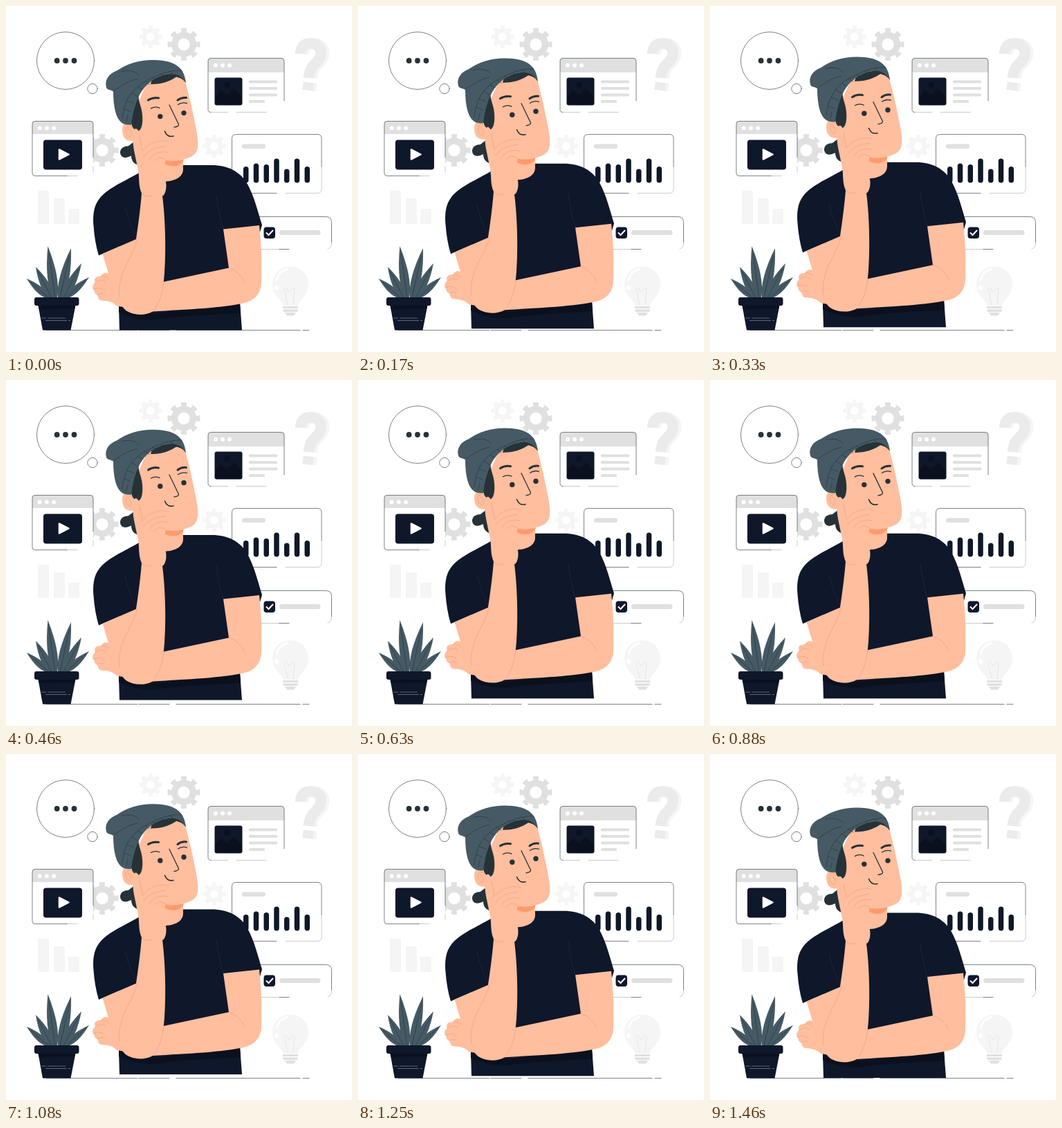
Recreate the animation shown at these times as an HTML page. Size 500x500 px, loop 1500 ms.

```html
<!DOCTYPE html>
<html lang="en">
<head>
<meta charset="utf-8">
<title>Thinking</title>
<style>
html, body { margin: 0; width: 100%; height: 100%; overflow: hidden; background: #fff; }
svg { display: block; width: 100%; height: 100%; }
.navy { fill: #0f172a; }
.shade { fill: #0a101e; }
.dark { fill: #263238; }
.slate { fill: #455a64; }
.skin { fill: #ffbe9d; }
.grey { fill: #e0e0e0; }
.pale { fill: #f5f5f5; }
.white { fill: #fff; }
.line, .faint, .crease, .bold, .rib { fill: none; stroke-linecap: round; stroke-linejoin: round; }
.line { stroke: #263238; stroke-width: .6; }
.faint { stroke: #263238; stroke-width: .25; }
.crease { stroke: #eb9d78; stroke-width: .6; }
.bold { stroke: #263238; stroke-width: 1.3; }
.rib { stroke: #263238; stroke-width: .6; }
</style>
</head>
<body>
<svg viewBox="0 0 500 500">
  <defs>
    <g id="mark" fill="none" stroke-width="15.500">
      <path d="M425.500 69C426 57 433 53.500 441 54C450 54.500 456 60 455 69C454 83 439 82 437.500 104"/>
      <path d="M437.500 110.500L436 122"/>
    </g>
  </defs>

  <g id="gears"></g>

  <g class="pale">
    <rect x="46" y="267" width="16" height="48"/>
    <rect x="69" y="278" width="16" height="37"/>
    <rect x="90" y="293" width="16" height="22"/>
  </g>

  <!-- question mark -->
  <use href="#mark" stroke="#f5f5f5" x="4.500" y=".5"/>
  <use href="#mark" stroke="#ebebeb"/>

  <!-- light bulb -->
  <path class="pale" d="M400 433C399 424 385 419 385 402A26 26 0 0 1 437 402C437 419 423 424 422 433Z"/>
  <path d="M391 396C393 387 399 382 407 380" fill="none" stroke="#fff" stroke-width="2.500" stroke-linecap="round"/>
  <circle class="white" cx="391" cy="407" r="3.500"/>
  <path d="M407 432L402 409Q405 404 407 410T412 410T417 409L415 432" fill="none" stroke="#e0e0e0" stroke-width=".7"/>
  <path class="grey" d="M400 434H422V437H400ZM400 438.500H422L421 442H401ZM403 443H419L416 447.500H406Z"/>

  <!-- thought bubble and ground -->
  <g class="line">
    <circle cx="86" cy="79" r="41.500"/>
    <circle cx="125" cy="119.500" r="7.200"/>
    <path d="M58 468.500H190M192 468.500H236M246 468.500H425M429 468.500H438"/>
  </g>
  <g class="dark">
    <circle cx="73.700" cy="79" r="3.900"/><circle cx="86" cy="79" r="3.900"/><circle cx="98.500" cy="79" r="3.900"/>
  </g>

  <!-- article window -->
  <rect class="white" x="292" y="75.500" width="110" height="78" rx="4"/>
  <path class="grey" d="M292 96V79.500Q292 75.500 296 75.500H398Q402 75.500 402 79.500V96Z"/>
  <path class="line" d="M296 153.500Q292 153.500 292 149.500V79.500Q292 75.500 296 75.500H398Q402 75.500 402 79.500V137"/>
  <path class="faint" d="M296 153.500H321M333 153.500H376"/>
  <g class="white"><circle cx="303" cy="85.700" r="3"/><circle cx="313" cy="85.700" r="3"/><circle cx="323" cy="85.700" r="3"/></g>
  <rect class="navy" x="301.500" y="103.500" width="40" height="40" rx="3"/>
  <path class="shade" d="M302 132L311 121L319 129L330 119L341 132V140Q341 143 338 143H305Q302 143 302 140Z"/>
  <circle class="shade" cx="319.500" cy="114" r="4"/>
  <g class="grey">
    <rect x="351" y="107.500" width="41" height="4" rx="1.500"/><rect x="351" y="117" width="41" height="4" rx="1.500"/>
    <rect x="351" y="126.500" width="41" height="4" rx="1.500"/><rect x="351" y="136" width="23" height="4" rx="1.500"/>
  </g>

  <!-- video window -->
  <rect class="white" x="38" y="166.500" width="88" height="79" rx="4"/>
  <path class="grey" d="M38 185V170.500Q38 166.500 42 166.500H122Q126 166.500 126 170.500V185Z"/>
  <path class="line" d="M88 245.500H42Q38 245.500 38 241.500V170.500Q38 166.500 42 166.500H122Q126 166.500 126 170.500V219"/>
  <path class="faint" d="M88 245.500H103M126 232V240"/>
  <g class="white"><circle cx="48.700" cy="176.500" r="3"/><circle cx="58.900" cy="176.500" r="3"/><circle cx="69.200" cy="176.500" r="3"/></g>
  <rect class="navy" x="54" y="193.500" width="56" height="43" rx="4"/>
  <path d="M77 207.500V221.500L90.500 214.500Z" fill="#fff" stroke="#fff" stroke-width="2.500" stroke-linejoin="round"/>

  <!-- chart panel -->
  <rect class="white" x="326.500" y="185.500" width="129.500" height="85" rx="6"/>
  <path class="line" d="M391 270.500H332.500Q326.500 270.500 326.500 264.500V191.500Q326.500 185.500 332.500 185.500H450Q456 185.500 456 191.500V232"/>
  <path class="faint" d="M456 232V264.500Q456 270.500 450 270.500H404"/>
  <rect class="grey" x="341" y="199.500" width="34" height="6.500" rx="3.250"/>
  <g id="bars" class="navy"></g>

  <!-- checkbox panel -->
  <rect class="white" x="350" y="304.500" width="120.500" height="47" rx="8"/>
  <path class="line" d="M358 304.500H462.500Q470.500 304.500 470.500 312.500V341M409 351.500H395"/>
  <path class="faint" d="M470.500 341V343.500Q470.500 349 465 351M395 351.500H362"/>
  <rect class="navy" x="372.500" y="319.500" width="16.500" height="16.500" rx="4"/>
  <path d="M376.500 328L379.500 331L385.500 324.500" fill="none" stroke="#fff" stroke-width="2" stroke-linecap="round"/>
  <rect class="grey" x="395" y="324" width="59.500" height="7" rx="3.500"/>

  <!-- plant -->
  <g id="leaves"></g>
  <path class="navy" d="M46 430H101L93.500 468.500H53Z"/>
  <path class="shade" d="M46.500 433H100L99.500 437L48 438Z"/>
  <rect class="navy" x="41" y="421" width="64.500" height="12" rx="3"/>
  <path d="M51 451H58M60 451H86M57 454.500H88M90 454.500H93" stroke="#7d8792" stroke-width=".7"/>

  <g id="person">
    <path class="dark" d="M190 194C181 196 180 201 176 202C167 202 163 209 166 215C170 221 176 218 181 216C181 223 185 228 191 229Z"/>

    <!-- torso -->
    <path class="navy" d="M193 240C178 249 158 258 145 268C128 281 125 296 126.500 317C127.500 332 130 347 134 360L164 347L163 433L164 468H341L338 428L370 316C364 297 359 275 349 257C339 239 321 229.500 297 229.500H255Z"/>
    <path class="shade" d="M163 434L215 444L338 429L339 443C302 446 262 446 221 452C199 456 176 448 163 442Z"/>
    <path class="skin" d="M190 185L256 215V235C256 246 246 252 231 253L193 250Z"/>
    <path d="M228 222Q243 225 257 221Q254 230 243 231Q232 231 228 226Z" fill="#ff9a6c"/>

    <!-- folded arm -->
    <path class="skin" d="M314 322L366 316.500C369 345 370 371 369 397C369 411 363 423 347 428C315 436 260 438 212 441L160 433C153 425 144 426 138 425C132 424 134 420 132 417C126 415 129 411 126 409C124 405 126 401 129 399C126 393 131 389 137 390C140 384 147 383 150 388L172 406L228 398L322 378Z"/>
    <path class="crease" d="M322 378Q337 382 345 399M129 399Q136 393 144 398M126 409Q136 404 143 411M132 417Q137 413 142 416M137 390Q143 388 149 394"/>
    <path class="rib" d="M304 273Q307 300 314 322M172 289Q178 316 190 336"/>

    <!-- head -->
    <path class="skin" d="M192 136L206 106L256 98C265 128 270 153 275 178C278 196 280 211 268 217C254 224 238 225 226 221C207 216 191 206 187 192C183 196 176 195 172 191C166 183 167 169 174 168C179 166 183 170 185 176Z"/>
    <path class="crease" d="M184 176C178 170 172 174 173 181C174 186 177 188 181 188M177 177Q182 179 181 186"/>
    <path class="dark" d="M180 160L192 126C190 137 196 143 197 157C198 169 196 179 191 180C184 179 180 172 180 160ZM209 112.500C224 113 238 108 246 102C252 103 257 106 260 111L254 94L212 102Z"/>

    <!-- beanie -->
    <path class="slate" d="M167 168C159 162 155 146 155 123C150 120 146 121 145 117C142 106 149 97 160 93C174 83 193 77.300 212 77.300C231 77.300 245 81 253 91C257 96 259 103 260 110.500C253 99 244 96 232 98.500C216 102 202 112 194 126C186 141 183 156 181 171Q173 172 167 168Z"/>
    <path class="rib" d="M168 163C170 135 184 117 204 107C222 97 241 91 254 93M157 121C166 116 176 107 190 105M167 94C181 91 188 95 192 99M171 148L180 152M175 136L185 140M182 125L190 130M191 116L198 120M201 109L207 113M212 103L217 106M225 98L228 101M238 94L240 97M174 166L176 157"/>

    <!-- face -->
    <path class="bold" style="stroke-width:3" d="M205.500 135.500Q212 131 220.500 132.500M248 135.500Q254 131 260.500 132"/>
    <path class="bold" d="M209.500 147.500Q215 144 222 147M248.500 142Q254 138 261.500 140M236 142.500L249.500 170.500Q250 173.500 243 174.500"/>
    <circle class="dark" cx="222.800" cy="159" r="3.700"/>
    <circle class="dark" cx="257" cy="154" r="3.700"/>
    <path class="bold" style="stroke-width:1.600" d="M229.500 180.500Q233 189.500 242 187.500"/>

    <!-- raised arm -->
    <path class="skin" d="M139.500 357.500L188 336.500C191 316 194 295 196 270C191 259 193 248 191 237L186 213C183 199 182 184 185 178C189 174 192 179 193 187L197 208C205 198 220 192 233 194C239 196 235 201 231 202C239 204 239 209 235 211C240 217 238 222 231 222C227 232 230 242 231 254C233 264 229 274 226 274C230 305 231.500 350 229 385C227 412 223 433 212 441C201 447.500 184 446.500 174 440C159 428 148 385 139.500 357.500Z"/>
    <path class="crease" d="M193 187L197 209Q205 198 220 195Q230 193 235 196M199 217Q208 204 231 202M207 222Q214 207 235 211M214 224Q221 214 231 222M196 270Q201 276 210 274M228 398Q225 424 215 437M190 336C184 359 169 375 164 402Q163 416 164 421"/>
  </g>
</svg>
<script>
const $ = id => document.getElementById(id);

function gear(x, y, r, color) {
  return `<g transform="translate(${x} ${y})" fill="none" stroke="${color}">
    <circle r="${r * .57}" stroke-width="${r * .4}"/>
    <circle r="${r * .87}" stroke-width="${r * .26}" pathLength="16" stroke-dasharray="1" stroke-dashoffset=".5"/></g>`;
}

function leaf(tipX, tipY, baseX, bulge) {
  const baseY = 422, dx = baseX - tipX, dy = baseY - tipY, len = Math.hypot(dx, dy);
  const px = -dy / len * bulge, py = dx / len * bulge;
  const mx = tipX + dx * .65, my = tipY + dy * .65;
  return `<path class="slate" d="M${tipX} ${tipY}Q${mx + px} ${my + py} ${baseX - 3} ${baseY}H${baseX + 3}Q${mx - px} ${my - py} ${tipX} ${tipY}"/>
    <path class="rib" d="M${tipX + dx * .15} ${tipY + dy * .15}L${baseX} ${baseY}"/>`;
}

$('gears').innerHTML = gear(209, 44.5, 16.5, '#f5f5f5') + gear(257, 55.5, 23.5, '#e0e0e0')
  + gear(139, 208.5, 23.5, '#e0e0e0') + gear(301, 202.5, 16.5, '#f5f5f5');

$('bars').innerHTML = [232, 227.5, 229, 220.5, 235.5, 220.5, 232].map((top, i) =>
  `<rect x="${343 + i * 14.75}" y="${top}" width="7.5" height="${255.5 - top}" rx="3.75"/>`).join('');

$('leaves').innerHTML = [[30, 394, 62, 9], [120, 392, 86, 9], [43, 377, 66, 11], [109, 372, 83, 11],
  [94, 350, 78, 12], [60.5, 347, 71, 12]].map(l => leaf(...l)).join('');

// The figure floats up 10px and back at constant speed.
function draw(now) {
  const phase = now % 1500 / 1500;
  const rise = 10 * (1 - Math.abs(1 - 2 * phase));
  $('person').setAttribute('transform', `translate(0 ${.6 - rise})`);
  requestAnimationFrame(draw);
}
draw(0);
</script>
</body>
</html>
```
